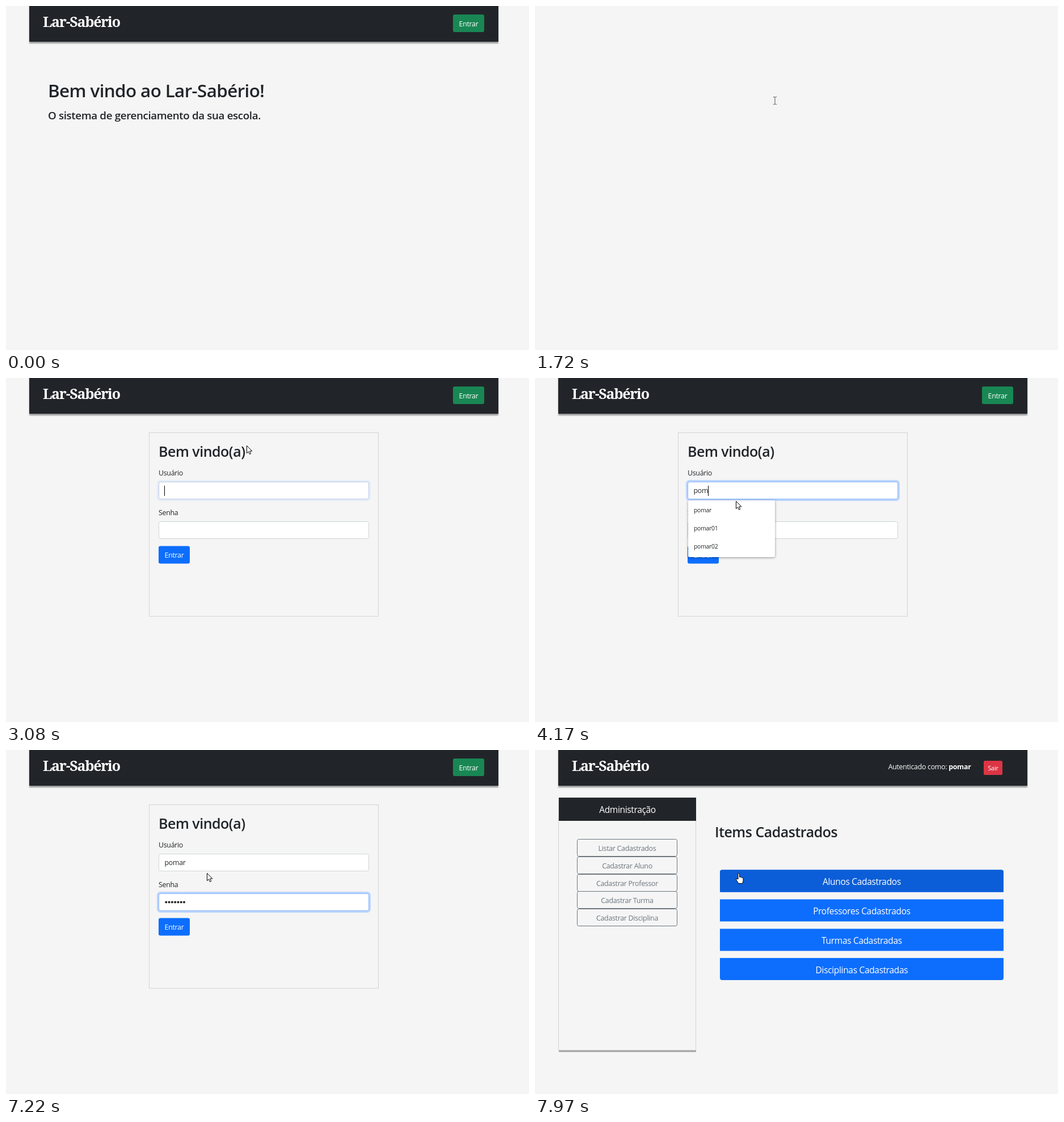
Animation, 922 px wide and 607 px high, one loop 8 s. Source, as an HTML page:

```html
<!DOCTYPE html>
<html lang="pt-BR">
<head>
<meta charset="utf-8">
<title>Login</title>
<style>
  html, body { margin: 0; width: 100%; height: 100%; overflow: hidden; background: #f5f5f5; }
  svg { display: block; }
  text { font: 12.4px "Open Sans", "Noto Sans", sans-serif; letter-spacing: -.024em; fill: #212529; white-space: pre; }
  .mid { text-anchor: middle; }
  .light { fill: #fff; }
  .brand { font: 700 25px "Noto Serif", serif; letter-spacing: -.05em; fill: #fff; }
  .title { font-weight: 600; font-size: 25px; letter-spacing: -.02em; }
  .hero { font-size: 31.4px; }
  .lead { font-size: 18.8px; }
  .large { font-size: 15.6px; }
  .small { font-size: 10.4px; }
  .bar { fill: #212529; filter: drop-shadow(0 3px 1px rgba(0, 0, 0, .38)); }
  .field { fill: #fff; stroke: #ced4da; }
  .ring { fill: none; stroke: #bcd5fd; stroke-width: 3.2; }
  .focus { fill: none; stroke: #86b7fe; }
  .popup { fill: #fff; filter: drop-shadow(0 1px 2px rgba(0, 0, 0, .4)); }
  .outline { fill: none; stroke: #6c757d; }
  .muted { fill: #6c757d; }
  .primary { fill: #0d6efd; }
</style>
</head>
<body>
<svg width="922" height="607" viewBox="0 0 922 607">
  <g data-show="0-1376 3010-8000">
    <rect class="bar" x="41" y="-4" width="827" height="67"/>
    <text class="brand" x="65" y="37">Lar-Sabério</text>
  </g>

  <g data-show="0-1376 3010-7360">
    <rect x="788" y="15" width="55" height="31" rx="3.2" fill="#198754"/>
    <rect data-show="950-1310" x="788" y="15" width="55" height="31" rx="3.2" fill="#157347"/>
    <text class="mid light" x="815.5" y="36">Entrar</text>
  </g>

  <g data-show="0-1376">
    <text class="title hero" x="74" y="161">Bem vindo ao Lar-Sabério!</text>
    <text class="title lead" x="74" y="200">O sistema de gerenciamento da sua escola.</text>
  </g>

  <g data-show="1860-2950">
    <rect class="popup" x="273" y="-10" width="363" height="101" rx="3"/>
    <g data-show="1930-2950">
      <text class="small" x="286" y="19">Usuário: estrela</text>
      <text class="small" x="289" y="35">Senha: estrela@123</text>
      <rect x="571" y="51.5" width="52" height="26.5" rx="2.5" fill="#2b78e0" stroke="#5596ee" stroke-width="1.5"/>
      <text class="small mid light" x="597" y="68.5" font-weight="600">OK</text>
    </g>
  </g>

  <g data-show="3010-7360">
    <rect x="252.5" y="96.5" width="404" height="324" fill="none" stroke="#d3d3d3"/>
    <text class="title" x="269" y="139">Bem vindo(a)</text>
    <text x="269" y="172">Usuário</text>
    <rect class="field" x="269.5" y="183.5" width="370" height="30" rx="3"/>
    <text x="269" y="242">Senha</text>
    <rect class="field" x="269.5" y="253.5" width="370" height="30" rx="3"/>
    <g data-show="3080-4550" data-fade="150">
      <rect class="ring" x="267.6" y="181.6" width="373.8" height="33.8" rx="4.5"/>
      <rect class="focus" x="269.5" y="183.5" width="370" height="30" rx="3"/>
    </g>
    <g data-show="4550-7360" data-fade="150">
      <rect class="ring" x="267.6" y="251.6" width="373.8" height="33.8" rx="4.5"/>
      <rect class="focus" x="269.5" y="253.5" width="370" height="30" rx="3"/>
    </g>
    <text id="user" x="279.5" y="203"></text>
    <g id="dots"></g>
    <rect class="primary" x="269" y="296.5" width="55" height="31" rx="3.2"/>
    <text class="mid light" x="296.5" y="317">Entrar</text>
    <rect id="userCaret" data-show="3080-3490 3690-4550" y="190" width="1" height="18"/>
    <rect id="passCaret" data-show="4620-5090 5160-7220" y="259" width="1" height="17"/>
    <g data-show="3760-4290">
      <rect class="popup" x="270" y="216" width="153" height="100" rx="2"/>
      <text class="small" x="280" y="237">pomar</text>
      <text class="small" x="280" y="269">pomar01</text>
      <text class="small" x="280" y="301">pomar02</text>
    </g>
  </g>

  <g data-show="7360-8000">
    <text class="light" x="768.5" y="34" text-anchor="end">Autenticado como: <tspan font-weight="700">pomar</tspan></text>
    <rect x="791" y="19" width="33" height="25" rx="2.6" fill="#dc3545"/>
    <text class="mid light" x="807.5" y="35.5" style="font-size:10.9px">Sair</text>

    <rect x="42" y="529.5" width="242" height="3.5" fill="#a9a9a9"/>
    <rect x="41.5" y="84.5" width="242" height="445" fill="#f5f5f5" stroke="#d3d3d3"/>
    <rect x="42" y="84" width="242" height="41" fill="#212529"/>
    <text class="mid large light" x="163" y="111">Administração</text>
    <g id="menu"></g>

    <text class="title" x="317" y="154">Items Cadastrados</text>
    <rect class="primary" x="326" y="211.5" width="500" height="39" rx="4"/>
    <rect class="primary" x="326" y="220" width="500" height="30.5"/>
    <g data-show="7890-8000" data-fade="80" fill="#0b5ed7">
      <path d="M326 250.5v-35q0-4 4-4h492q4 0 4 4v35z"/>
    </g>
    <rect class="primary" x="326" y="263.5" width="500" height="39"/>
    <rect class="primary" x="326" y="315.5" width="500" height="39"/>
    <path class="primary" d="M326 367h500v35q0 4-4 4h-492q-4 0-4-4z"/>
    <g id="lists"></g>
  </g>

  <g id="cursor" data-show="260-8000" fill="#fff" stroke="#000" stroke-width="1">
    <path data-show="260-950 1310-1583 1860-7890"
          d="M.5 .5v13.2l3-2.8 2 4.6 2.2-.9-2-4.6h4.2z"/>
    <path data-show="1583-1860" fill="none" stroke="#555"
          d="M-3 -6.5h2.2l.8 .8 .8-.8h2.2M0 -6v12M-3 6.5h2.2l.8-.8 .8 .8h2.2"/>
    <path data-show="950-1310 7890-8000" stroke-linejoin="round"
          d="M4 11V2q0-1.5 1.3-1.5T6.6 2v5.2q2-.8 2.5 .6 1.700-.6 2.200 .7 1.700-.4 1.700 1.300v3.700q0 2.500-1.500 5h-6.500Q2.500 15 .7 11.700q-.2-1.700 1.400-1.500z"/>
    <circle data-show="1100-1240 2810-2950" cx="-1" cy="0" r="10.5"
            fill="#e8e337" fill-opacity=".62" stroke="none"/>
  </g>
</svg>

<script>
const LOOP = 8000;
const USER = "pomar";
const USER_KEYS = [3690, 3960, 4070, 4180, 4290];
const PASS_KEYS = [5160, 5430, 5570, 6040, 6290, 6490, 6690];
const DOT_STEP = 5.28;

// time, x, y
const PATH = [
  [260, 888, 536], [520, 872, 350], [800, 826, 100], [960, 814, 34], [1020, 813, 31],
  [1240, 813, 31], [1480, 630, 95], [1720, 423, 167], [1860, 412, 184], [1930, 412, 183],
  [2300, 515, 112], [2560, 581, 68], [2670, 588, 65], [2900, 588, 65],
  [3080, 424, 119], [3250, 364, 200], [3420, 354, 217]
];

const byId = id => document.getElementById(id);

function add(parent, tag, attrs, text = "") {
  const el = document.createElementNS("http://www.w3.org/2000/svg", tag);
  for (const key in attrs) el.setAttribute(key, attrs[key]);
  el.textContent = text;
  parent.append(el);
  return el;
}

["Listar Cadastrados", "Cadastrar Aluno", "Cadastrar Professor", "Cadastrar Turma", "Cadastrar Disciplina"]
  .forEach((label, i) => {
    const y = 157.5 + Math.round(i * 30.8);
    add(byId("menu"), "rect", { class: "outline", x: 74.5, y, width: 176, height: 30, rx: 3 });
    add(byId("menu"), "text", { class: "mid muted", x: 162.5, y: y + 20 }, label);
  });

["Alunos Cadastrados", "Professores Cadastrados", "Turmas Cadastradas", "Disciplinas Cadastradas"]
  .forEach((label, i) =>
    add(byId("lists"), "text", { class: "mid large light", x: 576, y: 237.5 + i * 52 }, label));

const dots = PASS_KEYS.map((_, i) =>
  add(byId("dots"), "circle", { cx: 282.3 + i * DOT_STEP, cy: 268.5, r: 2, fill: "#212529" }));

const timed = [...document.querySelectorAll("[data-show]")].map(el => ({
  el,
  fade: +el.dataset.fade || 0,
  spans: el.dataset.show.split(" ").map(span => span.split("-").map(Number))
}));

const ramp = v => Math.max(0, Math.min(1, v));
const typed = (keys, t) => keys.filter(k => k <= t).length;

function opacityAt({ spans, fade }, t) {
  const span = spans.find(([from, to]) => t >= from && t < to + fade);
  if (!span) return 0;
  if (!fade) return 1;
  return Math.min(ramp((t - span[0] + 40) / fade), ramp(1 - (t - span[1]) / fade));
}

function cursorAt(t) {
  const next = PATH.findIndex(p => p[0] > t);
  if (next === 0) return PATH[0].slice(1);
  if (next < 0) return PATH[PATH.length - 1].slice(1);
  const [a, b] = [PATH[next - 1], PATH[next]];
  const k = (t - a[0]) / (b[0] - a[0]);
  return [1, 2].map(i => Math.round(a[i] + (b[i] - a[i]) * k));
}

function render(t) {
  for (const item of timed) item.el.setAttribute("opacity", opacityAt(item, t));

  const user = byId("user");
  user.textContent = USER.slice(0, typed(USER_KEYS, t));
  byId("userCaret").setAttribute("x", Math.round(279 + user.getComputedTextLength()));

  const count = typed(PASS_KEYS, t);
  dots.forEach((dot, i) => dot.setAttribute("opacity", i < count ? 1 : 0));
  byId("passCaret").setAttribute("x", Math.round(279 + count * DOT_STEP));

  byId("cursor").setAttribute("transform", `translate(${cursorAt(t)})`);
}

const start = performance.now();
function tick() {
  render((performance.now() - start) % LOOP);
  requestAnimationFrame(tick);
}
tick();
</script>
</body>
</html>
```
